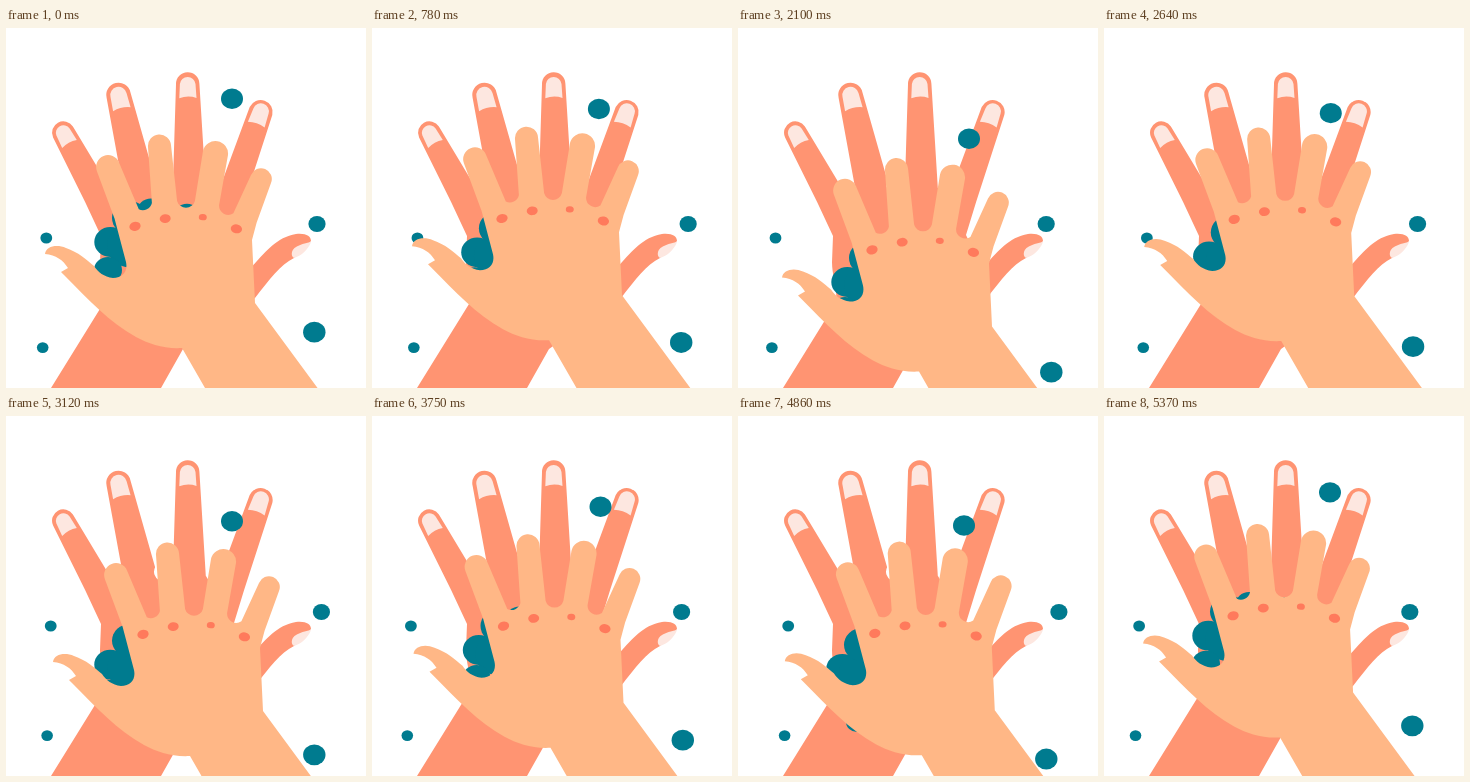
Recreate the animation shown at these times as an HTML page. Size 360 px wide and 360 px high, loop 5.4 s.

```html
<!DOCTYPE html>
<html lang="en">
<head>
<meta charset="utf-8">
<title>Hand washing</title>
<style>
  html, body { margin: 0; width: 100%; height: 100%; overflow: hidden; background: #fff; }
  svg { display: block; width: 100vw; height: 100vh; }
  .back { fill: #ff9472; }
  .front { fill: #ffb786; }
  .nail { fill: #fde7e0; }
  .foam { fill: #007b8f; }
  .knuckle { fill: #ff7a5c; }
</style>
</head>
<body>
<svg viewBox="0 0 360 360">
  <g id="under"></g>
  <g id="side" class="foam"></g>
  <g id="rise" class="foam"></g>
  <g id="hand"></g>
</svg>
<script>
  const CYCLE = 1800, STEP = 30, WEB = 9.2;
  const layer = id => document.getElementById(id);

  function add(parent, tag, attrs) {
    const el = document.createElementNS("http://www.w3.org/2000/svg", tag);
    for (const name in attrs) el.setAttribute(name, attrs[name]);
    parent.append(el);
  }

  const blob = (parent, x, y, r, squash, attrs) =>
    add(parent, "ellipse", { cx: x, cy: y, rx: r, ry: r * squash, ...attrs });

  // A tapered finger; at(along, across) is a point measured from the tip centre
  function finger(x, y, r, baseX, baseY, baseR) {
    const length = Math.hypot(baseX - x, baseY - y);
    const dx = (baseX - x) / length, dy = (baseY - y) / length;
    const at = (along, across) =>
      `${(x + dx * along + dy * across).toFixed(1)} ${(y + dy * along - dx * across).toFixed(1)}`;
    return { r, length, baseR, at };
  }

  // Outline of four fingers joined by round webs
  const fingersPath = fingers => fingers.map(({ r, length, baseR, at }, i) =>
    (i ? `A${WEB} ${WEB} 0 0 0 ` : "L") + at(length, -baseR)
    + `L${at(0, -r)}A${r} ${r} 0 0 1 ${at(0, r)}L${at(length, baseR)}`).join("");

  function nailPath({ r, at }) {
    const w = r * 0.67, h = r * 1.2;
    return `M${at(h, -w * 1.1)}L${at(0, -w)}A${w} ${w} 0 0 1 ${at(0, w)}`
      + `L${at(h, w * 1.1)}Q${at(h * 0.8, 0)} ${at(h, -w * 1.1)}Z`;
  }

  const backFingers = [
    finger(57, 104, 11.3, 91.5, 167, 14.2),
    finger(112.5, 67, 12.2, 133, 155, 16.5),
    finger(181.7, 56, 11.7, 183.3, 160, 16.5),
    finger(255, 83, 12, 225, 169.6, 13.9)
  ];
  const frontFingers = [
    finger(102, 139, 11.8, 120.7, 186, 13),
    finger(153.5, 118, 11.5, 158.5, 174, 12.7),
    finger(209.5, 125, 12.7, 201, 175, 12.3),
    finger(255, 151, 10.8, 239, 190, 12.5)
  ];

  const under = layer("under"), hand = layer("hand");
  add(under, "path", {
    class: "back",
    d: "M45 360L97 276C101 262 94 250 94 234L95 208" + fingersPath(backFingers)
      + "L228 207L244 241C259 224 271 209 290 206C300 205 305 208 305 213"
      + "L288 230C274 237 264 251 249 270L177 321L155 360Z"
  });
  for (const f of backFingers) add(under, "path", { class: "nail", d: nailPath(f) });
  add(under, "path", { class: "nail", d: "M305 214C299 215 287 218 286 224Q285 228 288 230C295 228 302 222 305 214Z" });

  add(hand, "path", {
    class: "front",
    d: "M39 226C40 218 51 216 60 220C72 224 81 232 88 238C92 244 98 249 107 250C117 250 122 243 120 234"
      + fingersPath(frontFingers)
      + "L246 212L249 275L341 400H222L176 320C158 321 143 316 130 309C103 294 83 272 58 247"
      + "L55 244L62 240C57 232 50 227 39 226Z"
  });
  for (const [x, y, r] of [[129, 198.3, 5.7], [159.2, 190.6, 5.5], [196.8, 189.2, 4], [230.4, 200.8, 5.7]]) {
    blob(hand, x, y, r, 0.79, { class: "knuckle", transform: `rotate(${(x - 185) / 4} ${x} ${y})` });
  }

  const bubbles = {
    side: [[40.3, 210, 5.9], [311, 196, 8.6], [36.7, 319.6, 5.8]],
    rise: [[226, 70.7, 11], [308.3, 304.2, 11.2],
           [104.3, 214, 16], [124, 218, 23], [102, 242, 14], [124, 190, 18],
           [145, 183, 13.5], [181, 188, 13.3], [119, 267, 11]]
  };
  for (const id in bubbles) {
    for (const [x, y, r] of bubbles[id]) blob(layer(id), x, y, r, 0.93);
  }

  // Turning points of each drift: time, x, y
  const drifts = {
    hand: [[0, 0, 0], [300, 5, 23.6], [780, 1, -7.8], [1320, 8, 20], [CYCLE, 0, 1.3]],
    rise: [[0, 0, 0], [300, 5, 40], [670, 1, 7], [1210, 0, 40], [1620, 0, 8], [CYCLE, 0, 5.5]],
    side: [[0, 0, 0], [300, -2.8, 0], [640, 10.5, 0], [880, 2, 0], [1170, 13.5, 0], [1530, -11, 0], [CYCLE, -5, 0]]
  };

  // Swing from one turning point to the next along half a cosine wave
  function drift(points, t) {
    const i = points.findIndex(p => p[0] > t);
    const [t0, x0, y0] = points[i - 1], [t1, x1, y1] = points[i];
    const k = (1 - Math.cos(Math.PI * (t - t0) / (t1 - t0))) / 2;
    return `translate(${x0 + (x1 - x0) * k} ${y0 + (y1 - y0) * k})`;
  }

  const start = performance.now();

  function draw(now) {
    const t = Math.floor(Math.max(0, now - start) / STEP) * STEP % CYCLE;
    for (const id in drifts) layer(id).setAttribute("transform", drift(drifts[id], t));
    requestAnimationFrame(draw);
  }
  draw(start);
</script>
</body>
</html>
```
